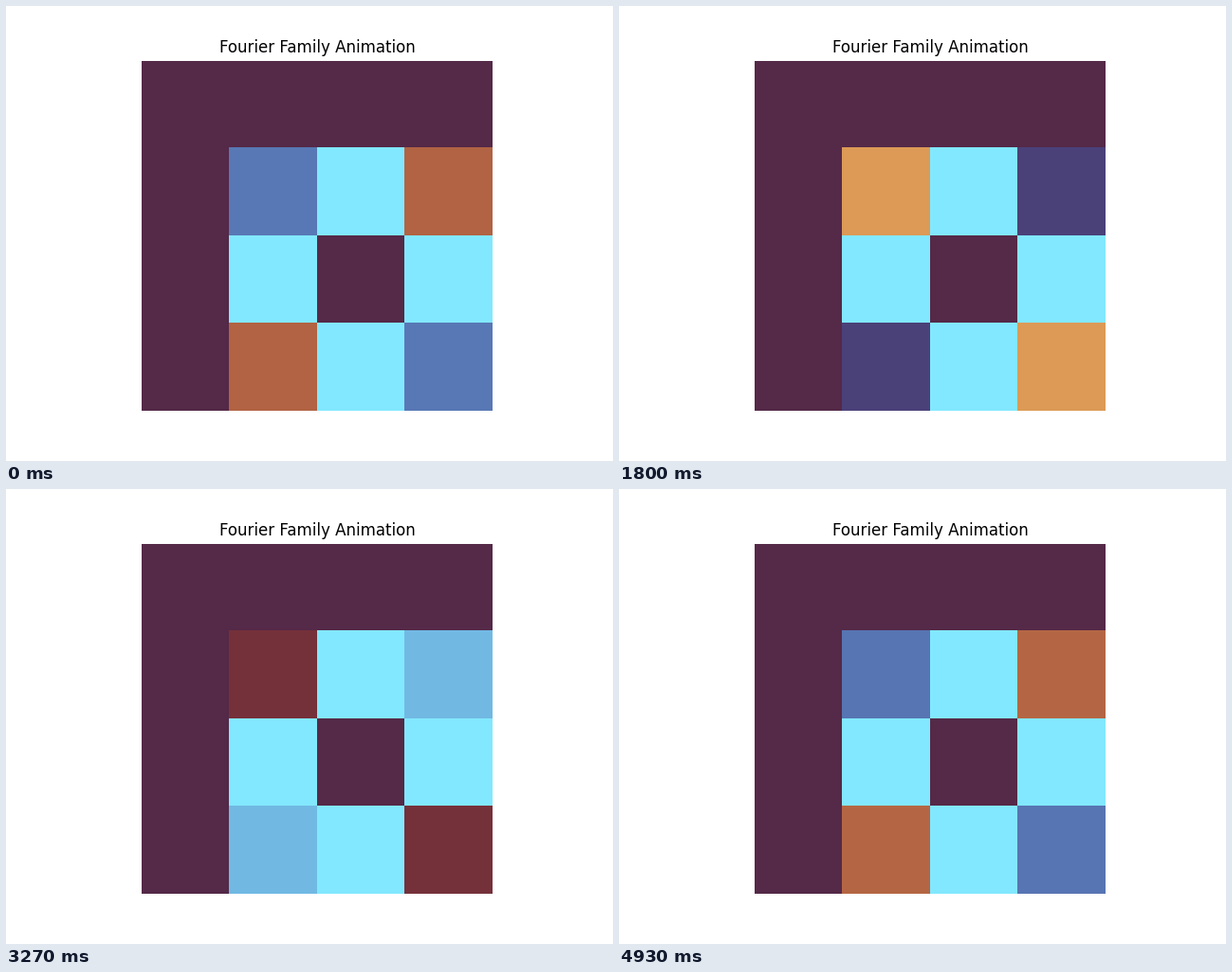
Write a matplotlib script that moves like this. It is 640 px wide and 480 px high and loops after 5 s.

```python
import numpy as np
import matplotlib.pyplot as plt
from matplotlib.animation import FuncAnimation
from matplotlib.colors import ListedColormap, to_rgb

LOOP_MS = 5000
TICK_MS = 20
STEPS = 150  # phase steps per loop, 30 a second

# Evenly spaced key colours from phase -pi to pi
KEYS = ["#ffcf67", "#d89454", "#b26444", "#82393a", "#562948",
        "#4c467f", "#5877b4", "#6ca9d9", "#82e8ff"]


def smooth_map(keys, size=256):
    """Colormap that runs through the keys on a cubic spline."""
    rgb = np.array([to_rgb(k) for k in keys])
    slope = np.gradient(rgb, axis=0)
    x = np.linspace(0, len(keys) - 1, size)
    i = np.minimum(x.astype(int), len(keys) - 2)
    s = (x - i)[:, None]
    curve = ((1 - s) ** 2 * ((1 + 2 * s) * rgb[i] + s * slope[i])
             + s ** 2 * ((3 - 2 * s) * rgb[i + 1] + (s - 1) * slope[i + 1]))
    return ListedColormap(np.clip(curve, 0, 1))


def phases(a):
    """Entry phases of the 4x4 Fourier family of Hadamard matrices."""
    z = 1j * np.exp(1j * a)
    return np.angle(np.array([
        [1, 1, 1, 1],
        [1, z, -1, -z],
        [1, -1, 1, -1],
        [1, -z, -1, z],
    ]))


plt.rcParams["font.family"] = "DejaVu Sans"
fig, ax = plt.subplots(figsize=(6.4, 4.8), dpi=100)
image = ax.imshow(phases(0), cmap=smooth_map(KEYS), vmin=-np.pi, vmax=np.pi,
                  interpolation="nearest")
ax.set_title("Fourier Family Animation", fontsize=12)
ax.axis("off")


def update(frame):
    # Steps are rounded to the 10 ms grid, so sample inside the tick
    step = int((frame * TICK_MS + 15) * STEPS / LOOP_MS)
    image.set_data(phases(2 * np.pi * step / (STEPS - 1)))
    return [image]


anim = FuncAnimation(fig, update, frames=LOOP_MS // TICK_MS, interval=TICK_MS,
                     repeat=True, repeat_delay=0, blit=False)
plt.show()
```
